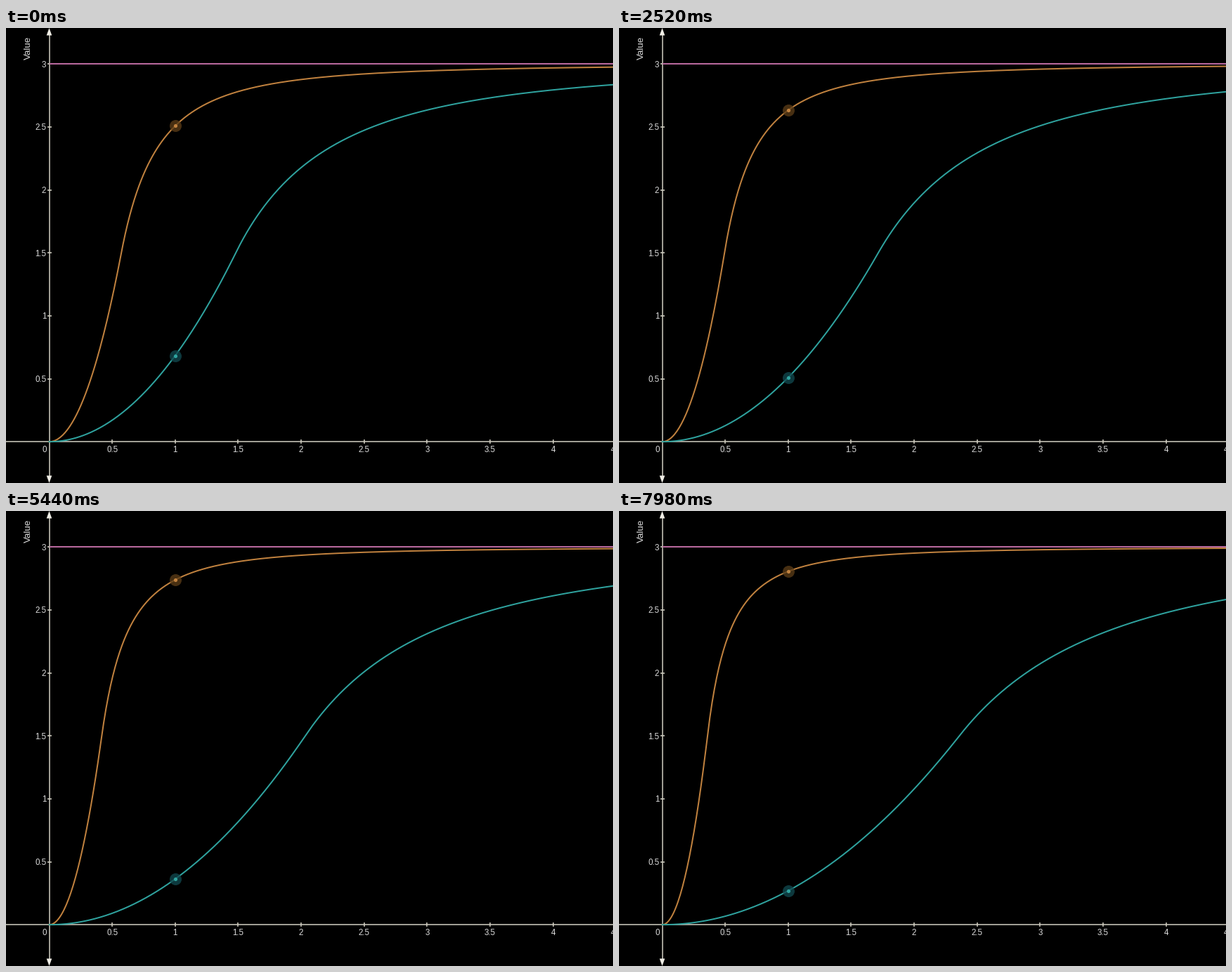
Animation, 864 px wide and 648 px high, one loop 8000 ms. Source, as a matplotlib script:

```python
import numpy as np
import matplotlib.pyplot as plt
from matplotlib.animation import FuncAnimation

plt.rcParams["font.family"] = "Liberation Sans"

W, H = 864, 648
X0, Y0, UNIT = 61.5, 589.2, 179.3
TOP = 3.0
TICK_MS, LOOP_MS = 20, 8000

AXIS = "#d6d3c6"
TEXT = "#dcdcdc"
PINK = "#b9699f"
ORANGE = "#c1823f"
TEAL = "#2fa39f"

# Step count and log of the quadratic factor at that step
STEPS = [0, 38, 70, 89, 116, 136, 171]
LOGS = [-0.380, -0.584, -0.763, -0.880, -1.013, -1.121, -1.311]
LINK = 0.719  # ties the steep curve to the shallow one


def px(x):
    return X0 + UNIT * x


def py(y):
    return Y0 - UNIT * y


def s_curve(x, a):
    """Quadratic up to half height, then an inverse-square approach to TOP."""
    half = TOP / 2
    q = a * x ** 2
    return np.where(q < half, q, TOP - half ** 2 / np.maximum(q, half))


def step_at(ms):
    """Pictures come in threes, held for 20, 20 and 100 ms."""
    group, rest = divmod(ms + 20, 140)
    return 3 * group + min(rest // 20, 2) - 1


fig = plt.figure(figsize=(W / 72, H / 72), dpi=72, facecolor="black")
ax = fig.add_axes([0, 0, 1, 1])
ax.set_xlim(0, W)
ax.set_ylim(H, 0)
ax.axis("off")


def segment(xs, ys, color=AXIS, width=1.5, z=1):
    ax.plot(xs, ys, color=color, lw=width, zorder=z, solid_capstyle="butt")


def label(x, y, s, size=11.5, ha="center", **kw):
    ax.text(x, y, s, color=TEXT, fontsize=size, ha=ha,
            va="center_baseline" if not kw else "center", zorder=1, **kw)


# Axes with arrow heads
segment([0, W], [Y0, Y0])
segment([X0, X0], [6, H - 6])
for tip, base in ((0, 10.5), (H, H - 10.5)):
    ax.fill([X0, X0 - 3.8, X0 + 3.8], [tip, base, base], color="#f0eee6", lw=0, zorder=2)

# Ticks and numbers
for k in range(1, 10):
    v = k / 2
    segment([px(v)] * 2, [Y0 - 3, Y0 + 3])
    label(px(v), 599, f"{v:g}")
    if v <= TOP:
        segment([X0 - 3, X0 + 3], [py(v)] * 2)
        label(57.3, py(v), f"{v:g}", ha="right")
label(54.3, 599, "0")
label(31.5, 28.5, "Value", size=13.4, rotation=90)

segment([X0, W], [py(TOP)] * 2, PINK, 2, 3)

xs = np.linspace(0, (W + 4 - X0) / UNIT, 500)


def make_curve(color, halo, z):
    line, = ax.plot([], [], color=color, lw=2, zorder=z)
    ring, = ax.plot([], [], "o", ms=17, mfc=halo, mec="none", alpha=0.78, zorder=z + 2)
    core, = ax.plot([], [], "o", ms=5.2, mfc=color, mec="none", zorder=z + 3)
    return line, ring, core


steep = make_curve(ORANGE, "#5c3d18", 4)
shallow = make_curve(TEAL, "#11494f", 5)


def place(parts, a):
    line, ring, core = parts
    line.set_data(px(xs), py(s_curve(xs, a)))
    y = py(float(s_curve(1.0, a)))
    for dot in (ring, core):
        dot.set_data([px(1)], [y])


def update(i):
    a = np.exp(np.interp(step_at(i * TICK_MS), STEPS, LOGS))
    place(shallow, a)
    place(steep, (TOP / 2) ** 2 / (LINK * a))
    return steep + shallow


anim = FuncAnimation(fig, update, frames=LOOP_MS // TICK_MS, interval=TICK_MS,
                     repeat=True, repeat_delay=0, blit=False)
plt.show()
```
